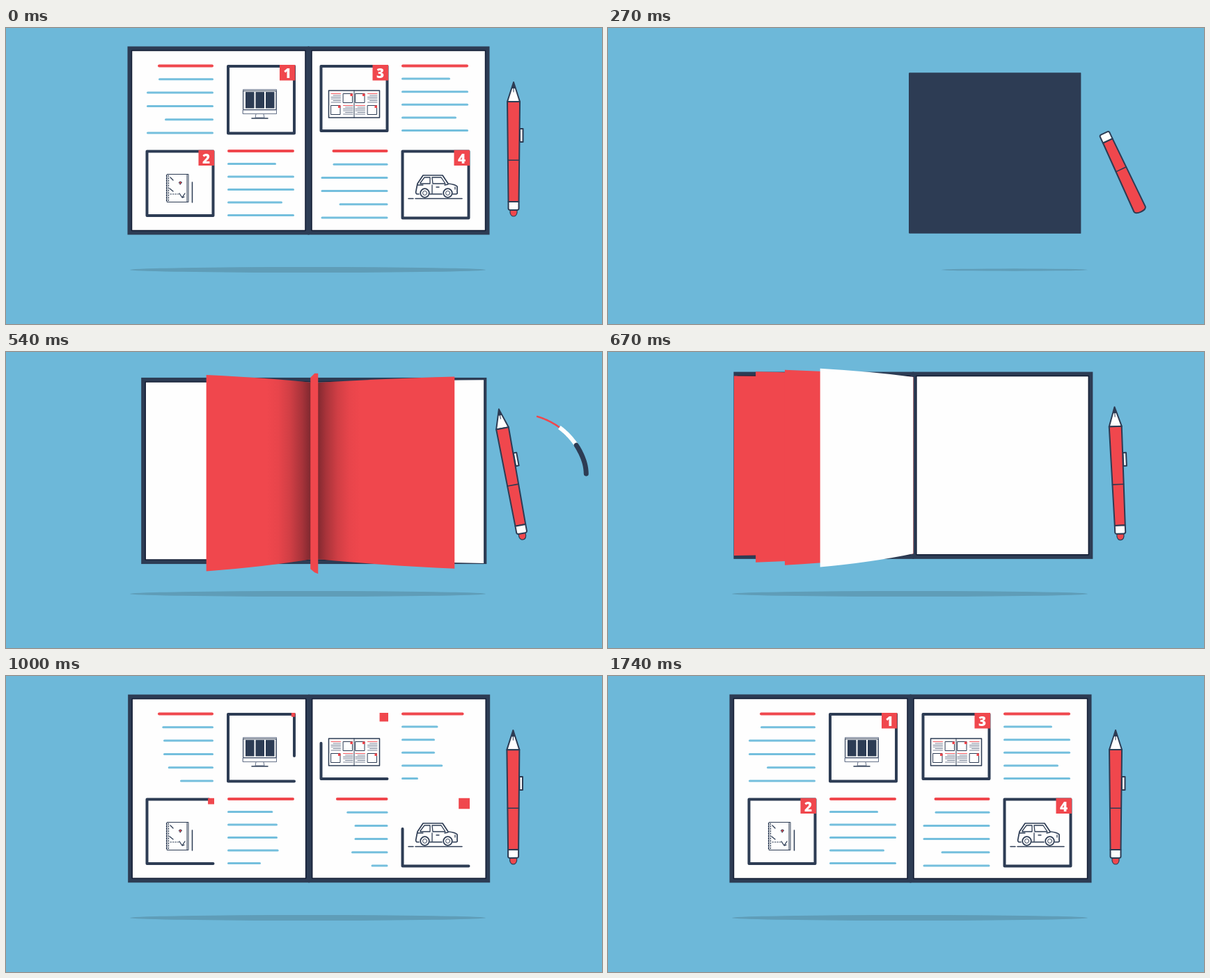
Recreate the animation shown at these times as an HTML page with a canvas. Size 856x426 px, loop 1940 ms.

```html
<!DOCTYPE html>
<html lang="en">
<head>
<meta charset="utf-8">
<title>Opening book</title>
<style>
html, body { margin: 0; width: 100%; height: 100%; overflow: hidden; background: #6db8d9; }
canvas { display: block; width: 856px; height: 426px; }
</style>
</head>
<body>
<canvas id="stage" width="856" height="426"></canvas>
<script>
const c = document.getElementById('stage').getContext('2d');
const SKY = '#6db8d9', NAVY = '#2d3c54', RED = '#f0474d', BLUE = '#74bfdd', WHITE = '#fefefe', GREY = '#67738a';
const LOOP = 1940, FPS = 15, LAST = 26;

const clamp = t => Math.max(0, Math.min(1, t));
const ease = t => (1 - Math.cos(Math.PI * clamp(t))) / 2;
const rad = d => d * Math.PI / 180;
const spring = (t, speed, damping) => Math.exp(-damping * t) * Math.cos(speed * t);

// All motion is a function of k, the time counted in steps of 1/15 s.
const POP = 4;
const grow = k => clamp(k / POP);
const bounce = k => spring(Math.max(0, k - POP), 1.25, 0.347);

const LEAVES = [
  { color: RED, start: 3, span: 8 },
  { color: RED, start: 3.25, span: 9.5 },
  { color: RED, start: 6.1, span: 6 },
  { color: WHITE, start: 7, span: 5 }
];

// Each card is a framed icon with a block of lines on its left or right.
const CARDS = [
  { x: 319, y: 54.5, h: 96.5, side: -1, text: 9, frame: 9.4, pop: 10, icon: monitor },
  { x: 202.5, y: 177, h: 92.5, side: 1, text: 9, frame: 10.4, pop: 13, icon: notebook },
  { x: 452.5, y: 54.5, h: 93, side: 1, text: 10, frame: 12, pop: 13, icon: spread },
  { x: 569.5, y: 177, h: 96, side: -1, text: 10, frame: 12, pop: 13, icon: car }
];
const STAGGER = [0, 1, 2, 2, 1, 3];

function rect(x1, y1, x2, y2, fill, stroke, lw) {
  if (fill) { c.fillStyle = fill; c.fillRect(x1, y1, x2 - x1, y2 - y1); }
  if (stroke) { c.strokeStyle = stroke; c.lineWidth = lw; c.strokeRect(x1, y1, x2 - x1, y2 - y1); }
}
function path(d, fill, stroke, lw) {
  const p = new Path2D(d);
  if (fill) { c.fillStyle = fill; c.fill(p); }
  if (stroke) { c.strokeStyle = stroke; c.lineWidth = lw; c.stroke(p); }
}
function disc(x, y, r, lw) {
  c.beginPath();
  c.arc(x, y, r, 0, 7);
  c.fillStyle = WHITE;
  c.fill();
  c.strokeStyle = NAVY;
  c.lineWidth = lw;
  c.stroke();
}
function poly(pts, fill) {
  c.beginPath();
  pts.forEach(p => c.lineTo(...p));
  c.closePath();
  c.fillStyle = fill;
  c.fill();
}

function monitor(k) {
  if (k < 13) {
    rect(342, 91, 387, 116.5, NAVY);
    rect(358.5, 92.5, 370.5, 115.5, null, '#dfe3e8', 1);
    rect(340.5, 118, 388.5, 123.5, WHITE, NAVY, 0.8);
    rect(358.5, 123.5, 371.5, 129, WHITE, NAVY, 0.8);
    return;
  }
  rect(341, 88.5, 388.5, 123.5, WHITE, GREY, 1);
  for (let i = 0; i < 3; i++) rect(344 + 14.5 * i, 92, 356.5 + 14.5 * i, 115.5, NAVY);
  rect(341, 90.5, 388, 117.5, null, NAVY, 1);
  rect(340.5, 118, 388.5, 123.5, WHITE, GREY, 1);
  path('M359 124l-1 5h13l-1-5', WHITE, GREY, 1);
  path('M353 130h23', null, NAVY, 1.5);
}
function notebook() {
  rect(231.5, 210.5, 262, 250.5, WHITE, NAVY, 1);
  path('M260 211v39', null, NAVY, 1);
  c.setLineDash([1.5, 2]);
  path('M230.5 212v38M233.5 212v38M236 239h12', null, NAVY, 1.2);
  c.setLineDash([]);
  path('M236 215l4 4M235 231l5 4M249 238l4 6 4-6M254 244l2-1', null, NAVY, 1.3);
  path('M248.5 222q2-2 4 0l-2 3z', RED, NAVY, 1);
  path('M267.5 222v29', null, NAVY, 1.5);
}
function spread() {
  rect(463.5, 90, 536.5, 129, WHITE, NAVY, 1.5);
  path('M500 90v39', null, NAVY, 1);
  for (let i = 0; i < 8; i++) {
    const col = i % 4, row = i >> 2, x = 467 + 17.5 * col, y = 94.5 + 17 * row;
    if ((col === 1 || col === 2) === !row) {
      rect(x, y, x + 13, y + 13, WHITE, NAVY, 1);
      rect(x + 10, y, x + 13.5, y + 3.5, RED);
    } else {
      for (let n = 0; n < 6; n++) {
        path(`M${x + (n % 3 === 1 ? 3 : 0)} ${y + n * 2.5}H${x + 13.5}`, null, n ? GREY : RED, 0.9);
      }
    }
  }
}
function car() {
  path('M578 245.5h7M588 245.5h67', null, NAVY, 1.5);
  path('M593 239h-3q-2-1-1-5l2-10 8-12h28l8 12q10 1 13 4v8q1 3-2 3h-4M609 239h17', WHITE, NAVY, 1.7);
  path('M595 223l6-8h8v9h-14zM612 215h13l6 9h-18zM591 226h8M612 226v12M630 226l5-1M618 229h4M645 229v3', null, NAVY, 1.3);
  for (const x of [601.5, 634.5]) {
    disc(x, 237.5, 6.3, 1.8);
    disc(x, 237.5, 3, 1);
  }
}

function rowLength(i, side) {
  if (i % 3 === 1) return (i === 1) === (side > 0) ? 70 : 79;
  return i === 0 && side < 0 ? 80 : 96;
}
function textBlock(card, k) {
  const { side } = card, x = card.x + (side > 0 ? 115.5 : -21);
  STAGGER.forEach((delay, i) => {
    const n = rowLength(i, side) * ease((k - card.text - delay) / 6);
    if (n < 1) return;
    const lw = i ? 3 : 4, cap = Math.min(lw, n) / 2, y = card.y + i * card.h / 5;
    path(`M${x + side * cap} ${y}H${x + side * Math.max(n - cap, cap + 0.1)}`, null, i ? BLUE : RED, lw);
  });
}
function frameBox({ x, y, h, frame }, k) {
  const p = ease((k - frame) / 7), around = 2 * (95 + h);
  if (!p) return;
  c.setLineDash(p < 1 ? [around * p, around] : []);
  path(`M${x + 95} ${y + 0.5 + h}h-95v${-h}h95z`, null, NAVY, 4);
  c.setLineDash([]);
}
function picture({ x, y, h, pop, icon }, k) {
  const s = ease((k - pop) / 2), mx = x + 47.5, my = y + h / 2 + 8;
  if (!s) return;
  c.save();
  c.translate(mx, my);
  c.scale(s, s);
  c.translate(-mx, -my);
  icon(k);
  c.restore();
}
function badge({ x, y }, i, k) {
  const start = 17 - 0.3 * i, size = 22.5 * ease((k - start + 3) / 3);
  if (!size) return;
  const right = x + 96.5, top = y - 1.5;
  c.save();
  c.beginPath();
  c.rect(right - size, top, size, size);
  c.clip();
  rect(right - 23, top, right, top + 23, RED);
  c.fillStyle = WHITE;
  c.font = "900 condensed 19px 'Open Sans', 'Noto Sans', sans-serif";
  c.textAlign = 'center';
  c.fillText(i + 1, right - 11.5, top + 19 - 22 * (1 - ease((k - start) / 4)));
  c.restore();
}

function flatSide(x, y, w, h, dir) {
  const edge = x + dir * w, top = y - h / 2, bottom = y + h / 2;
  rect(x - dir, top, edge, bottom, NAVY);
  rect(x + dir * 4.5, top + 6, edge - dir * 6, bottom - 6, WHITE, '#121c33', 1.5);
}
// The free edge of a turning sheet comes closer, so it grows and sinks a little.
function project(x, y, w, h, turn) {
  const lift = Math.sin(rad(turn)), scale = 1 + 0.14 * lift;
  const dx = w * Math.cos(rad(turn)) * scale, far = h / 2 * scale, mid = y + 4 * lift;
  return { dx, end: x + dx, top: mid - far, bottom: mid + far };
}
function cover(x, y, w, h, turn) {
  const { end, top, bottom } = project(x, y, w, h, turn), inside = turn > 90;
  const rim = end + (inside ? 8 : 0);
  poly([[x, y - h / 2], [rim, top], [end, top], [end, bottom], [rim, bottom], [x, y + h / 2]], NAVY);
  if (inside) poly([[x - 1, y - h / 2 + 7], [rim, top + 9], [rim, bottom - 9], [x - 1, y + h / 2 - 8]], WHITE);
}
function leaf(x, y, w, h, turn, color) {
  const { dx, end, top, bottom } = project(x, y, w, h, turn);
  if (Math.abs(dx) < 12) {
    poly([[x - 5, top + 6], [x + 1, top], [x + 6, top], [x + 6, bottom], [x + 1, bottom - 2], [x - 5, bottom - 7]], color);
    return;
  }
  const mid = x + dx * 0.45, bend = 0.65, near = h / 2;
  c.beginPath();
  c.moveTo(x, y - near);
  c.quadraticCurveTo(mid, (y - near) * (1 - bend) + top * bend, end, top);
  c.lineTo(end, bottom);
  c.quadraticCurveTo(mid, (y + near) * (1 - bend) + bottom * bend, x, y + near);
  c.closePath();
  c.fillStyle = color;
  c.fill();
  if (color !== RED) return;
  const shade = c.createLinearGradient(x, 0, x + Math.sign(dx) * 68, 0);
  for (let p = 0; p <= 1; p += 0.25) shade.addColorStop(p, `rgba(45,18,26,${0.66 * (1 - p) ** 2})`);
  c.fillStyle = shade;
  c.fill();
}

function book(k) {
  const w = 246 * grow(k) + 14 * ease((k - 7) / 4);
  const h = 271 * grow(k) * (1 - 0.148 * bounce(k));
  const x = k <= POP ? 556 - w / 2 : 434.5 + 15.5 * 0.5 ** (Math.max(0, k - 6) / 2);
  const y = 180 - 18 * ease((k - 5) / 6);
  const turn = 180 * ease((k - 3.85) / 4.15);

  flatSide(x, y, w, h, 1);
  if (turn === 180) flatSide(x, y, w, h, -1);
  if (k >= 12) {
    CARDS.forEach((card, i) => {
      textBlock(card, k);
      frameBox(card, k);
      picture(card, k);
      badge(card, i, k);
    });
    return;
  }
  const sheets = LEAVES.map(l => ({ color: l.color, turn: 180 * ease((k - l.start) / l.span) })).filter(l => l.turn > 0);
  const draw = l => leaf(x, y, w - 3, h - 15, l.turn, l.color);
  if (turn > 90 && turn < 180) cover(x, y, w, h, turn);
  sheets.filter(l => l.turn < 89).sort((a, b) => a.turn - b.turn).forEach(draw);
  sheets.filter(l => l.turn >= 89).sort((a, b) => b.turn - a.turn).forEach(draw);
  if (turn <= 90) cover(x, y, w, h, turn);
}

function shadow(k) {
  const s = clamp((k - 1.2) / 6.8);
  c.fillStyle = '#5f9db8';
  c.beginPath();
  c.ellipse(689 - 255.5 * s, 348, 255.5 * s, 4 * s, 0, 0, 7);
  c.fill();
}

function trail(k) {
  if (k < 5 || k > 9) return;
  const tail = 57 - 31.5 * (k - 6), head = 4 - 39 * (k - 6);
  const stroke = (from, to, color, lw) => {
    c.beginPath();
    for (let i = 0; i <= 12; i++) {
      const a = tail + (head - tail) * (from + (to - from) * i / 12);
      const r = 100 - 18 * ease((a + 20) / 70);
      c.lineTo(735.5 + r * Math.cos(rad(a)), 189 + r * Math.sin(rad(a)));
    }
    c.lineCap = color === WHITE ? 'butt' : 'round';
    c.strokeStyle = color;
    c.lineWidth = lw;
    c.stroke();
  };
  stroke(0.7, 1, RED, 2.5);
  stroke(0.4, 0.7, WHITE, 6);
  stroke(0.03, 0.4, NAVY, 7);
  c.lineCap = 'round';
}

function pen(k) {
  const t = k - POP;
  const x = 729 + 20 * spring(Math.max(1, t + 1), 0.869, 0.255);
  const y = 184 + 24 * 0.5 ** Math.max(0, t);
  const turn = k < 8 ? -205 - 33.6 * t - 1.94 * t * t : -360 - 10.5 * 0.5 ** (k - 8);
  const nib = clamp((k - 6) / 2);
  const end = 78 * grow(k) * (1 - 0.2 * bounce(k)), band = end - 12, lw = 2;
  c.save();
  c.translate(x, y);
  c.rotate(rad(turn));
  if (nib > 0) {
    const tip = -end - 28 * nib;
    path(`M-9 ${-end}L0 ${tip}L9 ${-end}Z`, WHITE, NAVY, lw);
    path(`M0 ${tip}l-2.6 ${9 * nib}h5.2z`, NAVY);
    path(`M0 ${tip}v${14 * nib}`, null, NAVY, 1);
    rect(9, -39, 9 + 4.5 * nib, -20, WHITE, NAVY, lw);
    path(`M-5 ${end}v${4 * nib}q1 ${5 * nib} 5 ${5 * nib}t5 ${-5 * nib}v${-4 * nib}z`, RED, NAVY, 1.2);
  }
  const top = nib > 0 ? `L9 ${-end}H-9` : `L9 ${-end + 4}Q8 ${-end} 0 ${-end}T-9 ${-end + 4}`;
  path(`M-7.5 ${band}H7.5${top}Z`, RED, NAVY, lw);
  path(`M-8 ${end * 0.08}H8`, null, NAVY, 1.6);
  path(`M-7.5 ${band}H7.5V${end - 2}Q7 ${end} 5 ${end}H-5Q-7 ${end} -7.5 ${end - 2}Z`, WHITE, NAVY, lw);
  c.restore();
}

function draw(time) {
  // The loop opens on the finished spread, then cuts to the start.
  const k = Math.min(LAST, Math.floor((time % LOOP + 0.5) * FPS / 1000)) || LAST;
  rect(0, 0, 856, 426, SKY);
  c.lineCap = c.lineJoin = 'round';
  shadow(k);
  book(k);
  trail(k);
  pen(k);
}

const begin = performance.now();
function tick() {
  draw(performance.now() - begin);
  requestAnimationFrame(tick);
}
tick();
</script>
</body>
</html>
```
